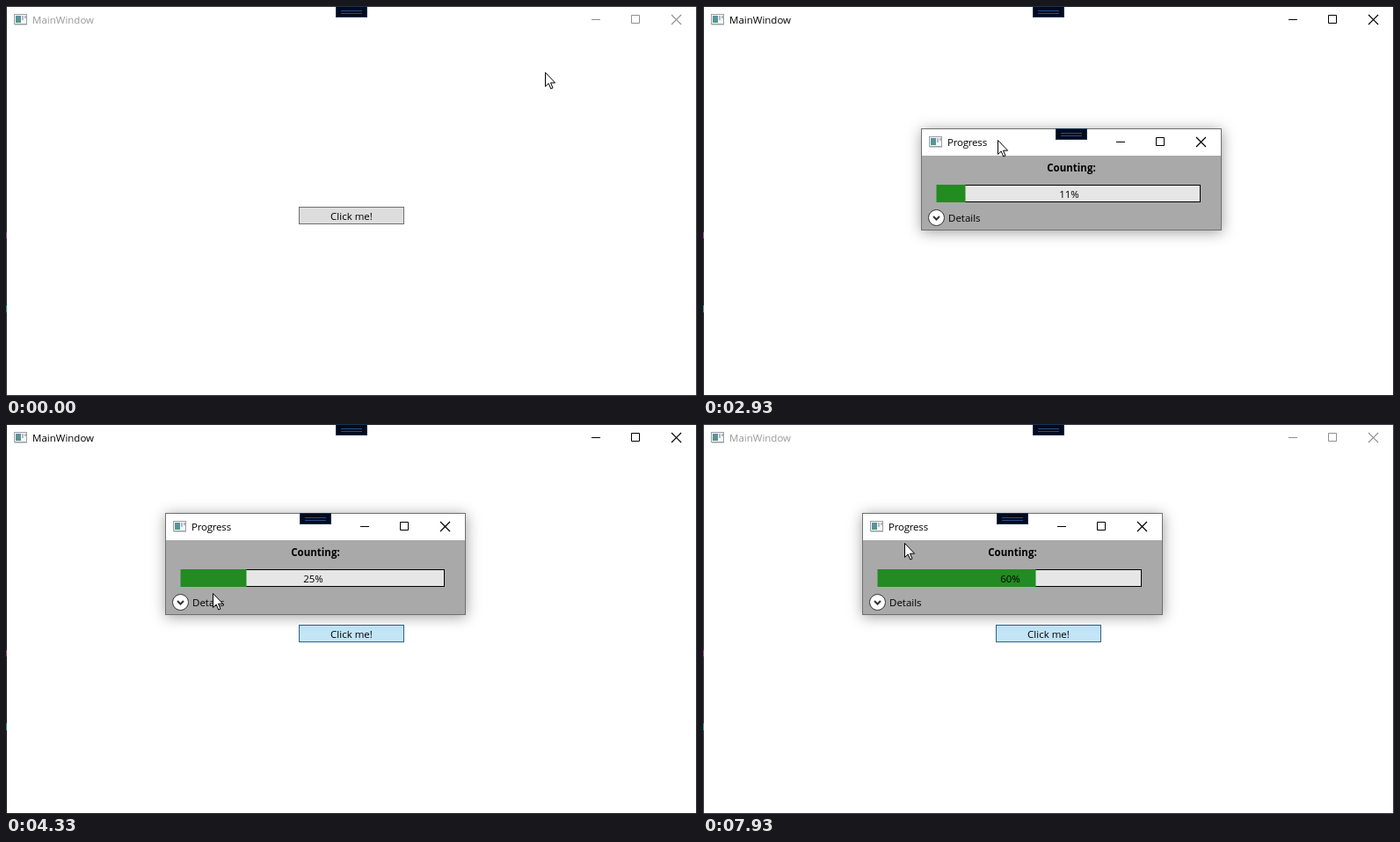
These frames come from a looping animation (786 px wide and 443 px high, 8 s). An HTML page:

```html
<!DOCTYPE html>
<html lang="en">
<head>
<meta charset="utf-8">
<title>Progress dialog</title>
<style>
html, body { margin: 0; width: 100%; height: 100%; overflow: hidden; background: #fff; }
svg { display: block; width: 100vw; height: 100vh; }
text { font: 11.5px "Open Sans", "Noto Sans", sans-serif; fill: #000; white-space: pre; }
.bold { font-weight: 700; }
.mid { text-anchor: middle; }
.tight { letter-spacing: -.2px; }
.line { fill: none; stroke: #000; }
#main.idle .line { stroke: #8f8f8f; }
#main.idle .title { fill: #999; }
#button { fill: #ddd; stroke: #707070; }
#button.hover { fill: #bee6fd; stroke: #3c7fb1; }
#button.down { fill: #c4e5f6; stroke: #2c628b; }
#knob { fill: #fff; stroke: #333; }
#knob.hover { fill: #f3f9ff; stroke: #5593ff; }
#knob.down { fill: #d9ecff; stroke: #3c77dd; }
</style>
</head>
<body>
<svg viewBox="0 0 786 443" xmlns="http://www.w3.org/2000/svg">
  <defs>
    <filter id="shadow" x="-20%" y="-40%" width="140%" height="180%">
      <feDropShadow dx=".5" dy="2" stdDeviation="8" flood-color="#000" flood-opacity=".38"/>
    </filter>
    <linearGradient id="teal" x2="0" y2="1">
      <stop offset="0" stop-color="#5f8fae"/><stop offset="1" stop-color="#4f9c7c"/>
    </linearGradient>
    <clipPath id="listClip"><rect x="11" y="117" width="308" height="140"/></clipPath>
    <g id="icon">
      <rect x=".5" y="1.5" width="14" height="11" fill="#f6f7f8" stroke="#9a9fa6"/>
      <path d="M1 13.5H15" stroke="#c9ccd0"/>
      <rect x="2" y="3" width="6" height="8" fill="url(#teal)"/>
      <path d="M9 3h2v5h-2zM12 3h2v3h-2z" fill="#b5bac2"/>
    </g>
    <g id="tab">
      <rect x=".5" y=".5" width="35" height="12" fill="#020a1e" stroke="#1b3350"/>
      <path d="M6 5.5H30M6 8.5H30" stroke="#284f80"/>
    </g>
    <!-- caption buttons, measured from the right edge of a window -->
    <g id="caption">
      <path d="M-120 15.5h10M-74.5 10.5h9v9h-9z"/>
      <path d="M-29 10l11 11M-18 10l-11 11" stroke-width="1.2"/>
    </g>
  </defs>

  <rect width="786" height="443" fill="#fff"/>
  <g id="main">
    <use href="#icon" x="9" y="8"/>
    <text class="title" x="30" y="20">MainWindow</text>
    <use href="#caption" class="line" x="786"/>
    <rect id="button" x="333.5" y="228.5" width="119" height="19"/>
    <text class="mid" x="393" y="243">Click me!</text>
    <rect id="frame" x=".5" y=".5" width="785" height="442" fill="none"/>
    <path d="M.5 257v7" stroke="#8c3f8c"/>
    <path d="M.5 340v8" stroke="#1f8f8f"/>
    <use href="#tab" x="375"/>
  </g>

  <g id="dialog">
    <rect id="back" width="342" fill="#707070" filter="url(#shadow)"/>
    <rect x="1" y="1" width="340" height="30" fill="#fff"/>
    <rect id="body" x="1" y="31" width="340" fill="#a9a9a9"/>
    <use href="#icon" x="9" y="8"/>
    <text class="tight" x="30" y="20">Progress</text>
    <use href="#caption" class="line" x="342"/>
    <use href="#tab" x="153"/>
    <text class="bold mid" x="171" y="49">Counting:</text>
    <rect x="18.5" y="64.5" width="299" height="19" fill="#e6e6e6" stroke="#000"/>
    <rect id="bar" x="17.5" y="64" height="20" fill="#228b22"/>
    <text id="percent" class="mid" x="168.5" y="79"></text>
    <circle id="knob" cx="17.5" cy="101.5" r="9"/>
    <path id="chevron" fill="none" stroke="#333" stroke-width="2"/>
    <text x="31" y="106">Details</text>
    <g id="details">
      <rect x="11" y="117" width="325" height="140" fill="#fff"/>
      <g id="rows" clip-path="url(#listClip)"></g>
      <rect x="319" y="117" width="17" height="140" fill="#f0f0f0"/>
      <rect id="thumb" x="319" width="17" fill="#cdcdcd"/>
      <path d="M324 128l3.5-3.5 3.5 3.5M324 247l3.5 3.5 3.5-3.5" fill="none" stroke="#999" stroke-width="1.5"/>
    </g>
  </g>

  <path id="cursor" d="M.5 .5V16.5L4.2 13 6.8 19 9 18 6.5 12.2H11.6Z" fill="#fff" stroke="#000"/>
</svg>
<script>
const LOOP = 8000, FPS = 15, ROW = 16, TRACK = 106, VIEW = 140;
const PRESS = 1700, OPEN = 1780, GRAB = 2740, DROP = 4000, EXPAND = 4660, COLLAPSE = 7060;
const $ = id => document.getElementById(id);
const set = (id, attrs) => {
  for (const name in attrs) $(id).setAttribute(name, attrs[name]);
};
const clamp = (v, lo, hi) => Math.min(hi, Math.max(lo, v));
const between = (v, lo, hi) => v >= lo && v < hi;
const inside = ([x, y], left, top, w, h) => between(x, left, left + w) && between(y, top, top + h);
const place = (id, [x, y]) => set(id, { transform: `translate(${Math.round(x)} ${Math.round(y)})` });

// Pointer moves; it rests in between
const moves = [
  { from: 640, to: 1447, x: 425, y: 223 },    // near the button
  { from: 1447, to: PRESS, x: 418, y: 238 },  // onto it
  { from: PRESS, to: 2600, x: 350, y: 190 },  // to the title bar
  { from: GRAB, to: 2933, x: 335, y: 152 },   // drag
  { from: 2933, to: 3200, x: 284, y: 124 },
  { from: 3200, to: 3533, x: 306, y: 128 },
  { from: 3533, to: DROP, x: 269, y: 117 },
  { from: DROP, to: 4333, x: 235, y: 192 },   // to the expander
  { from: 4333, to: 4467, x: 201, y: 203 },
  { from: 5070, to: 5830, x: 218, y: 329 },   // over the list and back
  { from: 5830, to: 6267, x: 201, y: 203 },
  { from: 7330, to: 7933, x: 229, y: 135 }    // away
];

function pointer(t) {
  let x = 613, y = 75;
  for (const m of moves) {
    const k = clamp((t - m.from) / (m.to - m.from), 0, 1);
    x += (m.x - x) * k;
    y += (m.y - y) * k;
  }
  return [x, y];
}

// The dialog trails the pointer slightly while it is dragged
function dialogPlace(t) {
  const [x, y] = pointer(clamp(t - 18, GRAB, DROP));
  return [x - 88.5, y - 16.2];
}

function count(t) {
  if (between(t, 2600, 2790)) t = 2600; // grabbing the title bar stalls the counter
  return Math.max(0, Math.floor((t - OPEN) / 101));
}

// The row below these stays blank
const rows = Array.from({ length: 8 }, (_, i) => {
  const row = document.createElementNS("http://www.w3.org/2000/svg", "text");
  row.setAttribute("x", 11);
  row.setAttribute("y", 126 + ROW * i);
  return $("rows").appendChild(row);
});

function draw(time) {
  const t = Math.floor((time + 4) * FPS / 1000) * 1000 / FPS;
  const tip = pointer(t), corner = dialogPlace(t);
  const expanded = between(t, EXPAND, COLLAPSE);
  const active = between(t, PRESS, 5500);

  set("main", { class: active ? "" : "idle" });
  set("frame", { stroke: active ? "#1b1b20" : "#2d2d38" });
  set("button", { class: t >= PRESS ? "down" : inside(tip, 333, 228, 120, 20) ? "hover" : "" });

  set("dialog", { visibility: t >= OPEN ? "visible" : "hidden" });
  place("dialog", corner);
  const height = expanded ? 261 : 116;
  set("back", { height });
  set("body", { height: height - 32 });

  const n = count(t);
  set("bar", { width: 3 * n });
  $("percent").textContent = n + "%";

  const over = inside(tip, corner[0] + 8, corner[1] + 92, 58, 20);
  const down = [EXPAND, COLLAPSE].some(click => between(t, click - 100, click));
  set("knob", { class: down ? "down" : over ? "hover" : "" });
  set("chevron", { d: expanded ? "M14 103.5l3.5-3.5 3.5 3.5" : "M14 100l3.5 3.5 3.5-3.5" });

  set("details", { display: expanded ? "inline" : "none" });
  rows.forEach((row, i) => row.textContent = n - 7 + i);
  const thumb = Math.round(TRACK * VIEW / (ROW * (n + 1)));
  set("thumb", { y: 240 - thumb, height: thumb });

  place("cursor", tip);
}

const start = performance.now();
function tick() {
  draw((performance.now() - start) % LOOP);
  requestAnimationFrame(tick);
}
tick();
</script>
</body>
</html>
```
